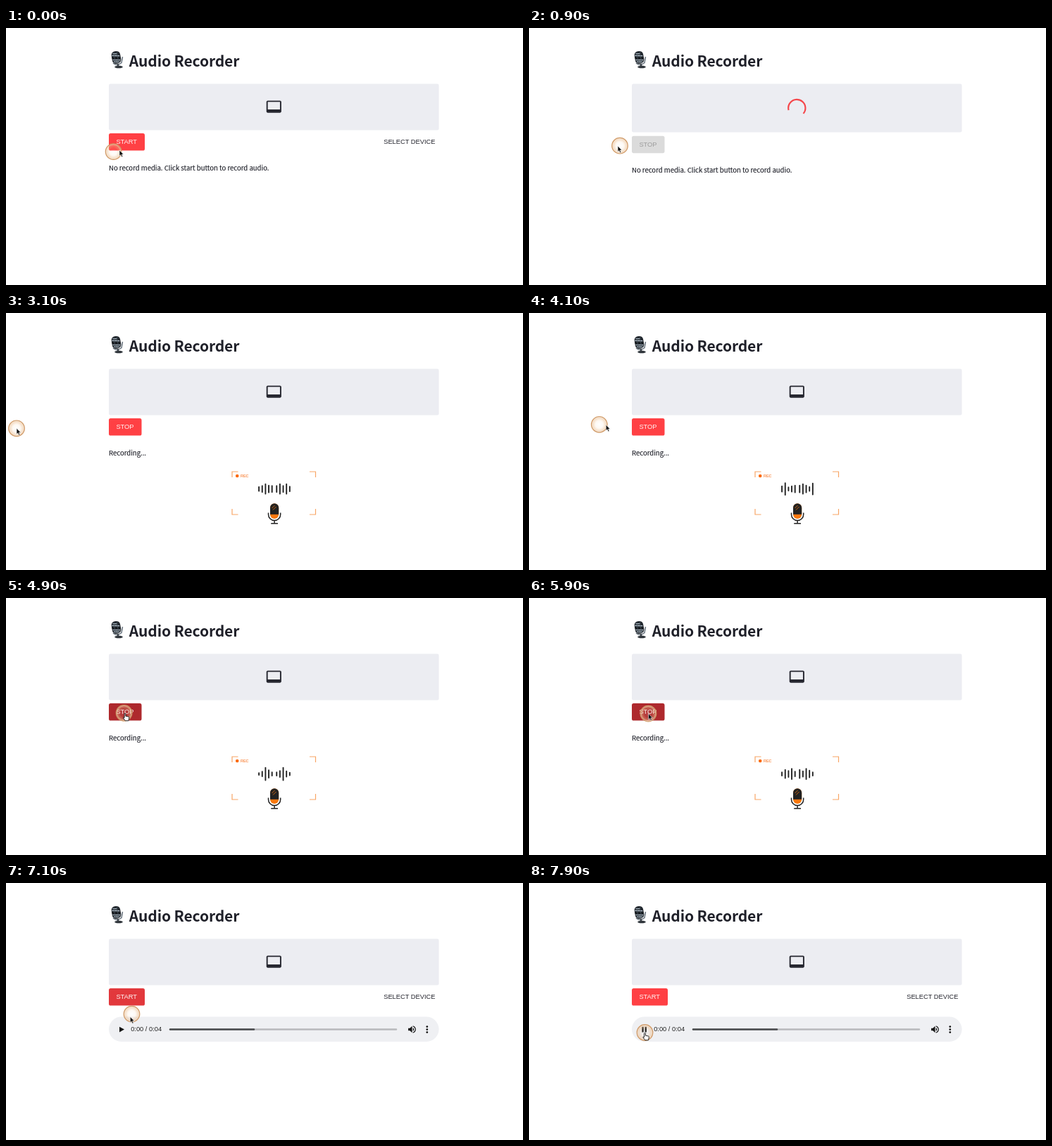
An HTML page that plays this animation: 734x366 px, repeating every 8000 ms.

```html
<!DOCTYPE html>
<html lang="en">
<head>
<meta charset="utf-8">
<title>Audio Recorder</title>
<style>
  html, body { margin: 0; width: 100%; height: 100%; overflow: hidden; background: #fff; }
  svg { display: block; width: 734px; height: 366px; }
  .sans { font-family: "Noto Sans CJK JP", "Noto Sans CJK SC", "Noto Sans CJK", "Open Sans", sans-serif; fill: #1f2029; }
  .ui { font-family: "Liberation Sans", Arial, sans-serif; font-size: 9.3px; }
</style>
</head>
<body>
<svg viewBox="0 0 734 366" xmlns="http://www.w3.org/2000/svg">
  <defs>
    <radialGradient id="halo">
      <stop offset="0" stop-color="#fff" stop-opacity=".15"/>
      <stop offset=".45" stop-color="#f3c99c" stop-opacity=".1"/>
      <stop offset="1" stop-color="#e3ae79" stop-opacity=".65"/>
    </radialGradient>
    <clipPath id="capsule"><rect x="375" y="271.2" width="12.2" height="21.8" rx="6.1"/></clipPath>
  </defs>

  <!-- heading -->
  <g>
    <path d="M152 50Q158 55 164 49.500L165.500 41" fill="none" stroke="#6b7680" stroke-width="1.5"/>
    <path d="M159 51v4" stroke="#3c444c" stroke-width="2.2"/>
    <ellipse cx="160" cy="55.4" rx="5.8" ry="1.8" fill="#30363c"/>
    <g transform="rotate(-10 156.500 42)">
      <rect x="150.2" y="33" width="12.6" height="17.8" rx="5.4" fill="#22282e"/>
      <path d="M152.500 35.800l6 1.200M151 38.400l10.500 2M151 44.600l10.500 2M152 47.400l8 1.600" stroke="#bccad6" stroke-width="1.2"/>
      <path d="M150.200 41.500l12.600 2" stroke="#15191d" stroke-width="1.4"/>
      <path d="M154 34.500v15M158.600 34.500v15" stroke="#4d5963" stroke-width=".7"/>
    </g>
    <text class="sans" x="174.8" y="54.6" font-size="21" font-weight="700" letter-spacing="-.13">Audio Recorder</text>
  </g>

  <rect id="panel" x="146" y="79.6" width="468.6" height="66" rx="2.4" fill="#ecedf2"/>
  <path id="screen" transform="translate(368.750 100.550) scale(.9625)" fill="#262730" d="M21 3H3c-1.1 0-2 .9-2 2v14c0 1.1.9 2 2 2h18c1.1 0 2-.9 2-2V5c0-1.1-.9-2-2-2zm0 13H3V5h18v11z"/>
  <g id="spinner"><circle id="arc" r="20.2" fill="none" stroke="#f5474b" stroke-width="3.6"/></g>

  <!-- controls -->
  <g id="controls">
    <rect id="button" x="146" y="150.1" height="24.5" rx="2.6"/>
    <text id="label" class="ui" x="156.4" y="165.4"></text>
    <text id="device" class="ui" x="609.4" y="165.4" text-anchor="end" fill="#262730">SELECT DEVICE</text>
    <text id="status" class="sans" x="146" y="202.5" font-size="9.55" stroke="#1f2029" stroke-width=".15"></text>
  </g>

  <!-- recording badge -->
  <g id="badge">
    <path d="M321 234v-8h8.5M431 226h8.5v8M321 279v8h8.5M431 287h8.5v-8" fill="none" stroke="#f8a566" stroke-width="1.2"/>
    <circle cx="328.2" cy="232" r="2.3" fill="#fb6a0a"/>
    <text class="ui" x="333" y="234.1" style="font-size:5.4px" fill="#f8823a" stroke="#f8823a" stroke-width=".15">REC</text>
    <path id="wave" fill="none" stroke="#222" stroke-width="1.9" stroke-linecap="round"/>
    <g clip-path="url(#capsule)">
      <rect x="375" y="271" width="13" height="22" fill="#fb780f"/>
      <rect x="375" y="271" width="13" height="15.8" fill="#222"/>
      <path d="M377.5 278l4-4M379 280.5l4.5-4.5" stroke="#fb780f" stroke-width=".8"/>
    </g>
    <path d="M372.5 284.5v2.4a8.6 8.6 0 0 0 17.2 0v-2.4M381.1 295.7v4M376.2 299.8h9.8" fill="none" stroke="#222" stroke-width="1.5"/>
  </g>

  <!-- audio player -->
  <g id="player">
    <rect x="146" y="190.5" width="468.6" height="35.4" rx="17.7" fill="#eff0f3"/>
    <path id="play" fill="#111"/>
    <text id="clock" class="ui" x="177.2" y="211.4" fill="#222"></text>
    <path d="M233 208.5H554" stroke="#b8b9bc" stroke-width="2.4" stroke-linecap="round"/>
    <path id="buffer" d="M233 208.5H352" stroke="#48494c" stroke-width="2.4" stroke-linecap="round"/>
    <path id="volume" transform="translate(569.3 201.3) scale(.6)" fill="#111" d="M3 9v6h4l5 5V4L7 9H3zm13.5 3c0-1.77-1.02-3.29-2.5-4.03v8.05c1.48-.73 2.5-2.25 2.5-4.02zM14 3.23v2.06c2.89.86 5 3.54 5 6.71s-2.11 5.85-5 6.71v2.06c4.01-.91 7-4.49 7-8.77s-2.99-7.86-7-8.77z"/>
    <g fill="#111"><circle cx="597.8" cy="204.6" r="1.35"/><circle cx="597.8" cy="208.6" r="1.35"/><circle cx="597.8" cy="212.6" r="1.35"/></g>
  </g>

  <!-- pointer -->
  <g id="ring">
    <circle r="11.3" fill="url(#halo)" stroke="#cf9a68" stroke-width="1.2"/>
    <circle r="10" fill="none" stroke="#fff" stroke-opacity=".35" stroke-width=".9"/>
  </g>
  <path id="arrow" d="M0 0V8.3L1.9 6.6 3.3 9.7 4.8 9 3.4 6H6Z" fill="#111" stroke="#fff" stroke-width=".6"/>
  <path id="hand" d="M-.9 .9Q0 -.4 .9 .9V4.2L4.8 5Q6 5.3 5.8 6.8L5 10.8H.3L-2.6 6.8Q-2.7 5.5-.9 6.5Z" fill="#fff" stroke="#111" stroke-width=".9" stroke-linejoin="round"/>
</svg>
<script>
const $ = id => document.getElementById(id);
const set = (id, attrs) => { for (const k in attrs) $(id).setAttribute(k, attrs[k]); };
const show = (id, on) => { $(id).style.display = on ? '' : 'none'; };
const text = (id, s) => { if ($(id).textContent !== s) $(id).textContent = s; };
const clamp = x => Math.min(1, Math.max(0, x));
const ease = x => x * x * (3 - 2 * x);
const mix = (a, b, p) => a.map((v, i) => v + (b[i] - v) * p);
const rgb = c => `rgb(${c.map(Math.round)})`;

const LOOP = 8000, STEP = 100;
const LOAD = 400, RECORD = 1300, STOPPING = 5900, DONE = 6300, READY = 6600, PLAY = 7700;

const RED = [255, 64, 68], DARK = [174, 41, 45], GRAY = [219, 219, 219];
const FADE = 250;
// start of each button fade and the colour it leads to
const fades = [[100, DARK], [LOAD, GRAY], [RECORD, RED], [4500, DARK], [STOPPING, GRAY], [6340, DARK], [6950, RED]];

// time, x, y of the pointer tip
const path = [
  [-100, 147, 177.5], [0, 161, 174], [200, 168, 166], [450, 168, 166], [800, 131, 167.5],
  [900, 126, 168], [1000, 108, 167], [1300, 8, 165], [1600, -7, 164.5], [1900, -16, 164],
  [2200, -13, 164], [2800, 15, 164.3], [3300, 15, 164.3], [3800, 62, 157], [4200, 125, 160],
  [4600, 162, 163], [4900, 169, 164], [5700, 169, 164], [6400, 171, 167], [6600, 171, 167],
  [7000, 180, 184], [7400, 165, 210], [7500, 165, 210], [7700, 164.5, 213], [8000, 164.5, 213]
];

// bar lengths, cycled
const poses = [
  [8, 17, 5, 8, 10, 10, 14, 10, 6, 16],
  [6, 9, 14, 10, 9, 9, 14, 9, 14, 7],
  [5, 12, 9, 15, 7, 12, 8, 15, 10, 5],
  [3, 7, 18, 11, 5, 5, 9, 18, 8, 4]
];

function tip(t) {
  let i = 1;
  while (i < path.length - 1 && path[i][0] < t) i++;
  const a = path[i - 1], b = path[i];
  return mix(a, b, clamp((t - a[0]) / (b[0] - a[0]))).slice(1);
}

function buttonColor(t) {
  return fades.reduce((c, [at, to]) => mix(c, to, ease(clamp((t - at) / FADE))), RED);
}

function drawSpinner(t) {
  const p = (t - LOAD + 10) / 1400 % 1;
  const grow = ease(clamp(p * 2)), shrink = ease(clamp(p * 2 - 1));
  set('spinner', { transform: `translate(380.3 114) scale(.6) rotate(${p * 360})` });
  set('arc', {
    'stroke-dasharray': `${1 + 99 * grow} 200`,
    'stroke-dashoffset': -15 * grow - 110 * shrink
  });
}

function drawWave(t) {
  const pose = poses[Math.max(0, Math.floor((t - 1600) / 300)) % poses.length];
  set('wave', { d: pose.map((h, i) => {
    const x = 359.1 + i * 4.65 + (i > 4 ? 1.9 : 0);
    return `M${x} ${250.6 - h / 2}v${h}`;
  }).join('') });
}

function drawPointer(t, disabled) {
  const [x, y] = tip(t), [rx, ry] = tip(t - 60);
  const onButton = !disabled && x > 146 && x < 194 && y > 150 && y < 173.5;
  const onPlay = t >= DONE && y > 198;
  const hand = onButton || onPlay;
  set('ring', { transform: `translate(${rx} ${ry})` });
  set('arrow', { transform: `translate(${x} ${y})` });
  set('hand', { transform: `translate(${x} ${y})` });
  show('arrow', !hand && x > -4);
  show('hand', hand);
}

function render(t) {
  const loading = t >= LOAD && t < RECORD;
  const recording = t >= RECORD && t < DONE;
  const done = t >= DONE, ready = t >= READY;
  const idle = t < LOAD || done;
  const color = buttonColor(t);
  const gray = clamp((color[1] - RED[1]) / (GRAY[1] - RED[1]));

  set('panel', { height: loading ? 69 : 66 });
  show('screen', !loading);
  show('spinner', loading);
  if (loading) drawSpinner(t);

  set('controls', { transform: `translate(0 ${loading ? 3.6 : 0})` });
  set('button', { width: idle ? 51 : 46.5, fill: rgb(color) });
  set('label', { fill: rgb(mix([255, 245, 245], [156, 156, 156], gray)) });
  text('label', idle ? 'START' : 'STOP');
  show('device', idle);
  text('status', done ? '' : recording ? 'Recording...' : 'No record media. Click start button to record audio.');

  show('badge', recording);
  if (recording) drawWave(t);

  show('player', done);
  set('play', { d: t >= PLAY ? 'M160.4 204.8h2.3v7.6h-2.3zM164.6 204.8h2.3v7.6h-2.3z' : 'M161 204.8L168 208.6 161 212.4Z' });
  text('clock', ready ? '0:00 / 0:04' : '0:00 / 0:00');
  show('buffer', ready);
  set('volume', { opacity: ready ? 1 : .35 });

  drawPointer(t, loading || (t >= STOPPING && t < 6400));
}

function tick() {
  const t = performance.now() % LOOP;
  render(Math.floor(t / STEP) * STEP);
  requestAnimationFrame(tick);
}
tick();
</script>
</body>
</html>
```
